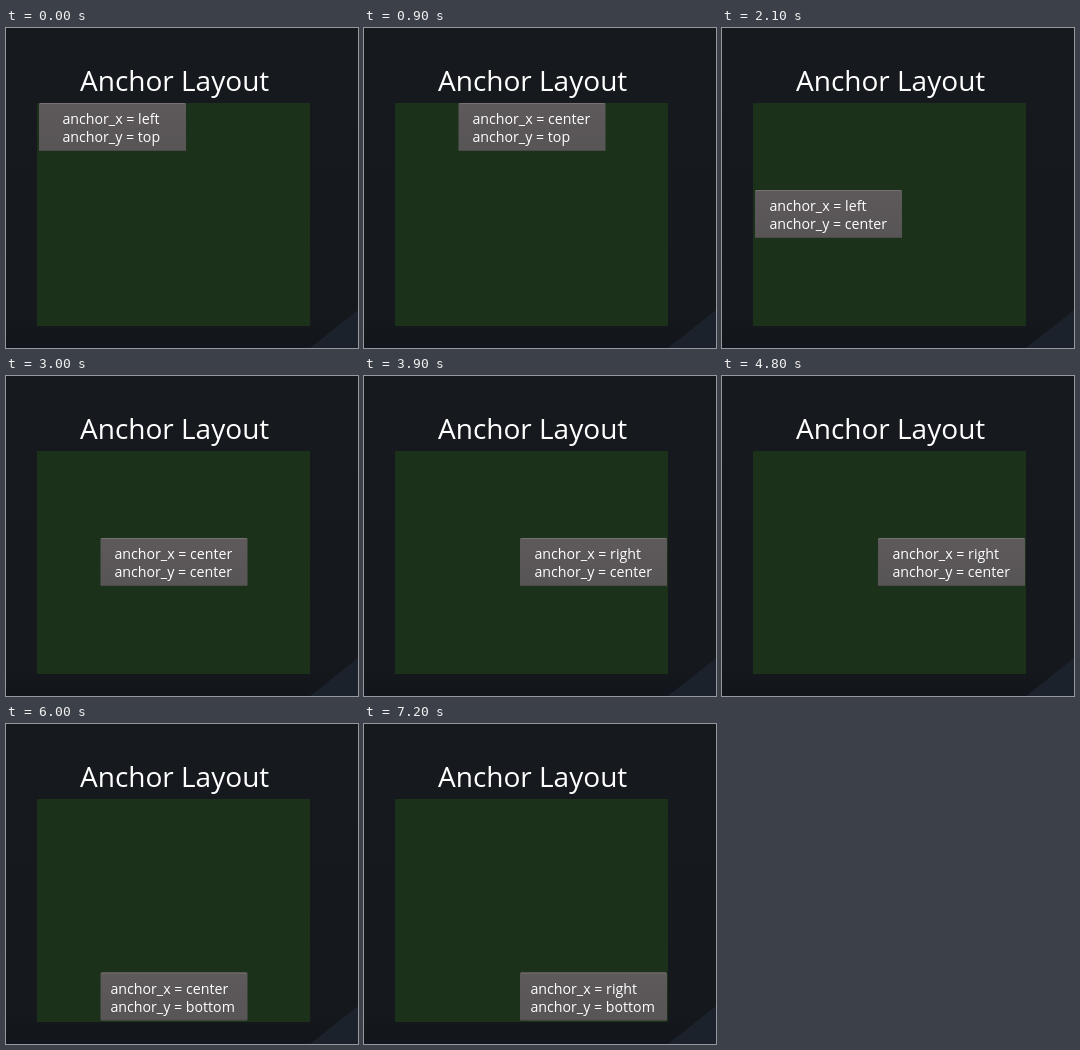
An HTML page that plays this animation: 352 by 320 pixels, repeating every 7.5 s.

```html
<!DOCTYPE html>
<html lang="en">
<head>
<meta charset="utf-8">
<title>Anchor Layout</title>
<style>
  html, body { margin: 0; width: 100%; height: 100%; overflow: hidden; background: #15191d; }
  svg { display: block; width: 352px; height: 320px; }
  text { font-family: "Open Sans", "Noto Sans", sans-serif; fill: #fff; white-space: pre; }
  .title { font-size: 28px; }
  .label { font-size: 14.2px; }
</style>
</head>
<body>
<svg viewBox="0 0 352 320">
  <defs>
    <linearGradient id="backdrop" x2="0" y2="1">
      <stop stop-color="#161a1e"/>
      <stop offset=".9" stop-color="#15191d"/>
      <stop offset="1" stop-color="#12161c"/>
    </linearGradient>
    <linearGradient id="face" x2="0" y2="1">
      <stop stop-color="#5e595b"/>
      <stop offset="1" stop-color="#585556"/>
    </linearGradient>
  </defs>
  <rect width="352" height="320" fill="url(#backdrop)"/>
  <path d="M304 320L352 282V320Z" fill="#1c222b"/>
  <text class="title" x="74" y="63">Anchor Layout</text>
  <rect x="31" y="75" width="273" height="223" fill="#1b3119"/>
  <g id="button">
    <rect width="147" height="48" rx="1" fill="url(#face)"/>
    <rect x="1" width="145" height="1" fill="#777175"/>
    <rect x="1" y="47" width="145" height="1" fill="#4b4a49"/>
  </g>
  <text class="label" id="lineX"></text>
  <text class="label" id="lineY"></text>
</svg>
<script>
  const LOOP = 7500;
  const starts = [0, 300, 1200, 2100, 3000, 3900, 5100, 6000, 6600];
  const columns = ["left", "center", "right"];
  const rows = ["top", "center", "bottom"];
  const tops = [75, 162, 248.5];
  const insets = [[24, 15, 20], [15, 15, 15], [11, 11, 11]];
  const byId = id => document.getElementById(id);
  let shown = -1;

  function setLine(id, content, x, y) {
    const line = byId(id);
    line.textContent = content;
    line.setAttribute("x", x);
    line.setAttribute("y", y);
  }

  function show(step) {
    const column = step % 3, row = Math.floor(step / 3);
    const left = 33 + 61.5 * column;
    const textX = Math.floor(left) + insets[row][column] - 0.6;
    const baseline = 96 + 87 * row;
    byId("button").setAttribute("transform", `translate(${left} ${tops[row]})`);
    setLine("lineX", `anchor_x = ${columns[column]}`, textX, baseline);
    setLine("lineY", `anchor_y = ${rows[row]}`, textX, baseline + 18);
  }

  function frame() {
    const time = performance.now() % LOOP;
    const step = starts.filter(start => start <= time).length - 1;
    if (step !== shown) show(shown = step);
    requestAnimationFrame(frame);
  }
  frame();
</script>
</body>
</html>
```
